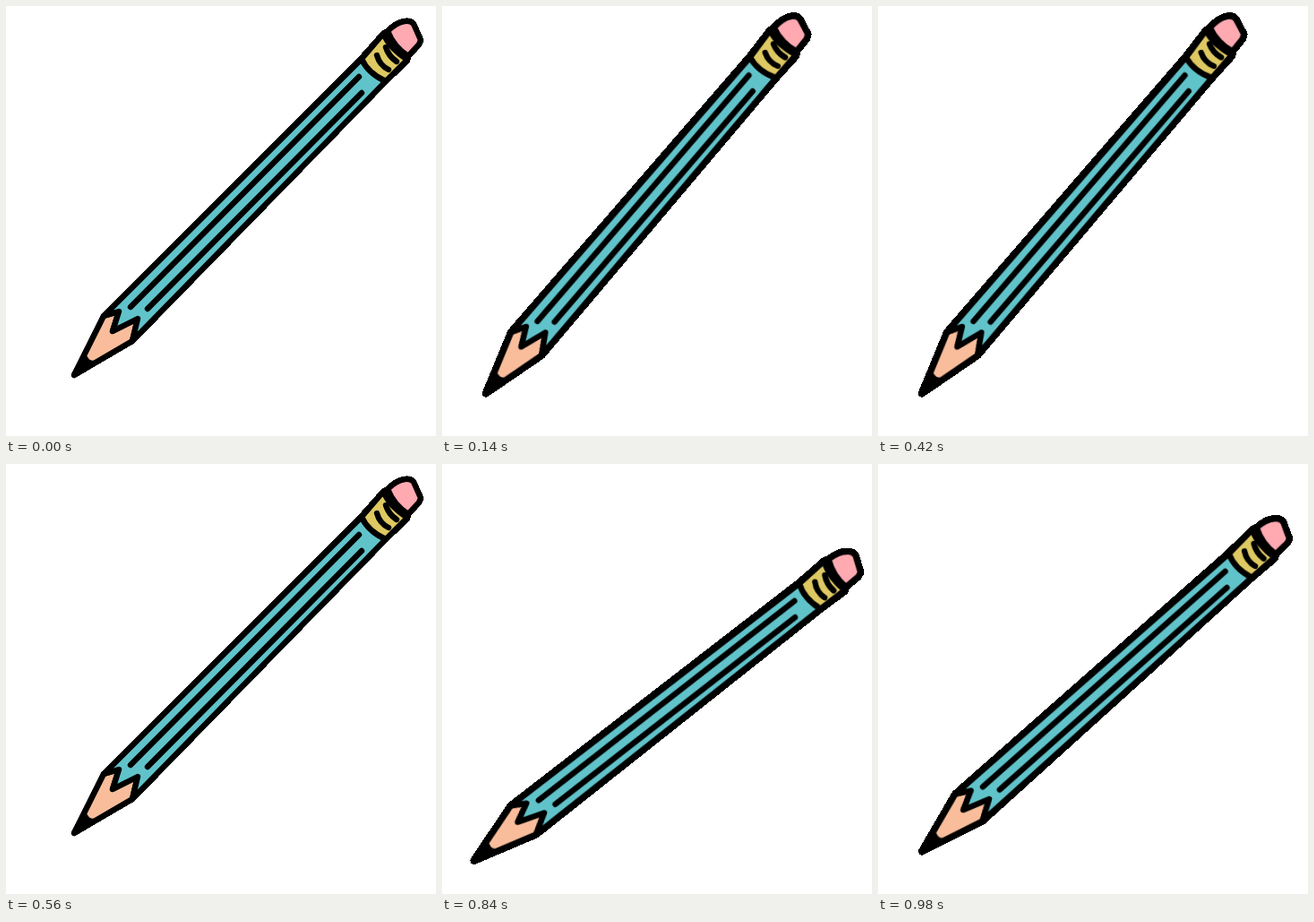
Write an HTML page that moves like this. It is 480 px wide and 480 px high and loops after 1.12 s.

```html
<!DOCTYPE html>
<html lang="en">
<head>
<meta charset="utf-8">
<title>Wiggling pencil</title>
<style>
  html, body { margin: 0; width: 100%; height: 100%; overflow: hidden; background: #fff; }
  svg { display: block; width: 100%; height: 100%; }
  path { stroke: #000; stroke-width: 6.4; stroke-linecap: round; stroke-linejoin: round; }
</style>
</head>
<body>
<svg viewBox="0 0 480 480">
  <defs>
    <filter id="soft" filterUnits="userSpaceOnUse" x="0" y="-60" width="540" height="600">
      <feGaussianBlur stdDeviation="0.75"/>
    </filter>
  </defs>
  <g id="pencil">
    <path id="silhouette" shape-rendering="crispEdges"
      d="M76 412L109 346 397 58 421 31 426 28Q436 18 445 17Q452 16 455 20L463 38 461 43 449 56 448 61 424 84 141 374Z"/>
    <g id="art">
      <path fill="#f9bd9b" d="M76 412L109 346 126 341 119 363 147 349 141 374Z"/>
      <path d="M76 412L88 393Q91 399 97 399Z" stroke-width="4"/>
      <path fill="#61c3ca" d="M109 346L397 59Q404 75 424 84L141 374 147 349 119 363 126 341Z"/>
      <path fill="none" d="M139 336L394 79M158 338L397 97"/>
      <path fill="#dec862" d="M397 59L421 31Q429 48 448 60L424 84Q404 75 397 59Z"/>
      <path fill="none" stroke-width="5.8" d="M424 46Q427 56 436 62M414 55Q417 66 427 71"/>
      <path fill="#ffa9b1" d="M426 28Q436 18 445 17Q452 16 455 20L463 38 461 43 449 56Q433 46 426 28Z"/>
    </g>
  </g>
</svg>
<script>
  const byId = id => document.getElementById(id);
  const pencil = byId("pencil"), silhouette = byId("silhouette"), art = byId("art");
  const STEP = 140;

  // Each pose gives the place of the tip and the turn in degrees.
  const rest = { x: 76, y: 412, turn: 0 };
  const up = { x: 49.1, y: 432.3, turn: -4.1 };
  const highest = { x: 39.1, y: 454.3, turn: -8.9 };
  const down = { x: 49.3, y: 432.3, turn: 3.6 };
  const lowest = { x: 35.7, y: 442.8, turn: 7.3 };
  const poses = [rest, up, highest, up, rest, down, lowest, down];

  function draw(time) {
    const pose = poses[Math.floor(time / STEP) % poses.length];
    const tilted = pose !== rest;
    pencil.setAttribute("transform",
      `translate(${pose.x} ${pose.y}) rotate(${pose.turn}) translate(-76 -412)`);
    silhouette.style.strokeWidth = tilted ? 8.6 : 6.6;
    art.setAttribute("filter", tilted ? "url(#soft)" : "none");
  }

  const start = performance.now();
  function tick(now) {
    draw(Math.max(0, now - start));
    requestAnimationFrame(tick);
  }
  draw(0);
  requestAnimationFrame(tick);
</script>
</body>
</html>
```
